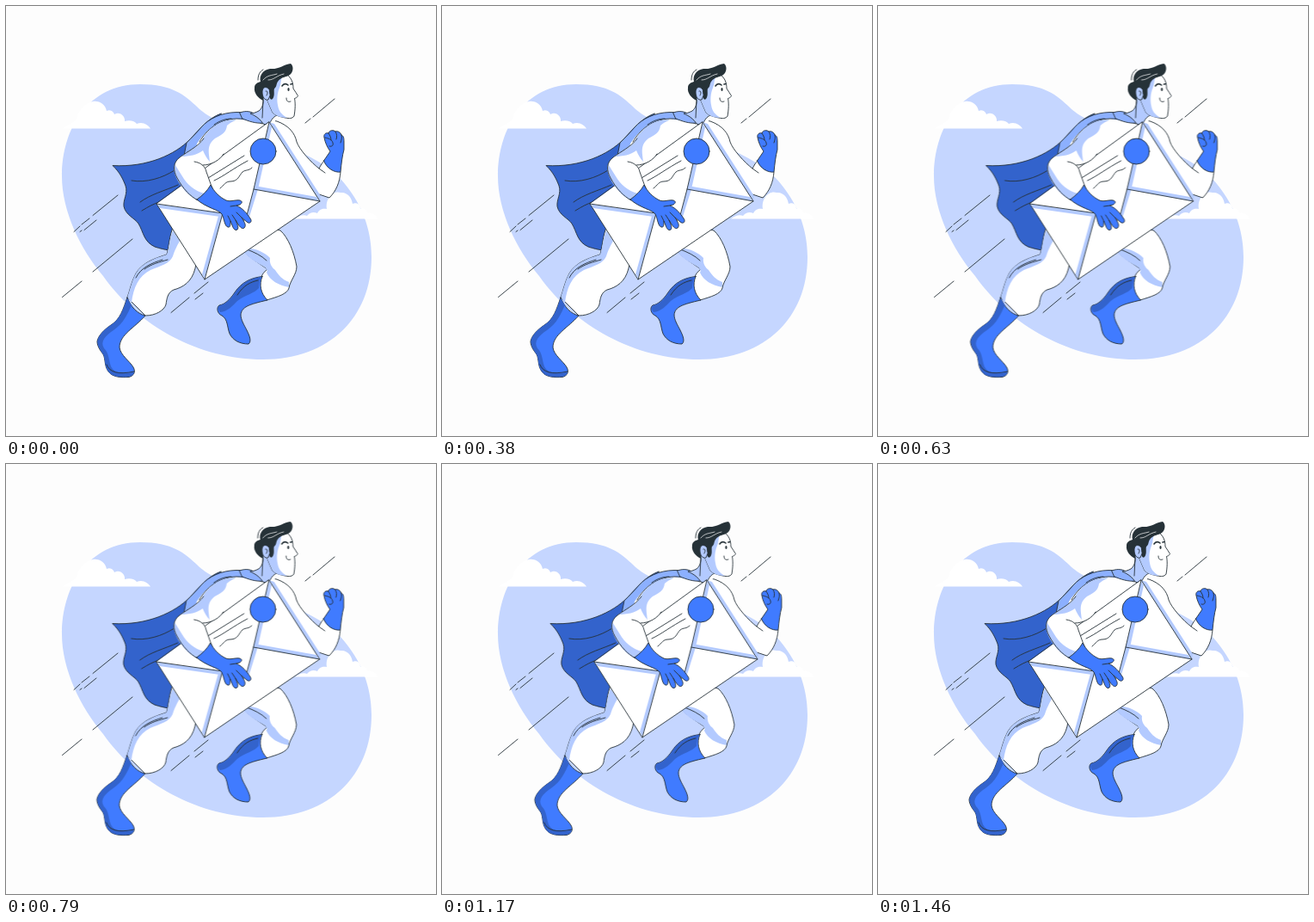
An HTML page for the animation above (1500 ms loop, 500 by 500 pixels).

```html
<!DOCTYPE html>
<html lang="en">
<head>
<meta charset="utf-8">
<title>Flying courier</title>
<style>
  html, body { margin: 0; width: 100%; height: 100%; overflow: hidden; background: #fdfdfd; }
  svg { display: block; width: 100%; height: 100%; }
  path, circle { stroke-linecap: round; stroke-linejoin: round; }
  .o { stroke: #263238; stroke-width: .9; }
  .l { fill: none; stroke: #263238; stroke-width: .9; }
  .w { fill: #fff; }
  .p { fill: #c5d6ff; }
  .s { fill: #b3caff; }
  .m { fill: #8cb0ff; }
  .b { fill: #407bff; }
  .d { fill: #3363cc; }
  .k { fill: #263238; }
  #hero { animation: shake 1.5s infinite; }
  @keyframes shake {
    10%, 90% { transform: translate(-1px, 0); }
    20%, 80% { transform: translate(2px, 0); }
    30%, 50%, 70% { transform: translate(-4px, 0); }
    40%, 60% { transform: translate(4px, 0); }
  }
</style>
</head>
<body>
<svg viewBox="0 0 500 500">
  <!-- backdrop -->
  <path class="p" d="M65 198C65 142 96 91 156 91C194 91 208 104 222 117C228 123 234 127 244 132C286 154 350 162 388 200C414 228 425 260 425 292C425 362 376 411 299 411C224 411 154 372 113 314C86 282 65 238 65 198Z"/>
  <path class="w" d="M66 142.500C72 137 79 137 82 131C85 121 92 112 101 111C109 110 115 114 117 122C122 120 125 123 126 126C132 122 139 128 138 134C144 132 150 134 152 137C159 134 165 138 168 142.500Z"/>
  <path class="w" d="M336 247.500C340 244 346 242 350 244C353 240 358 239 362 241C364 236 369 235 373 236C371 223 381 214 389 217C397 216 402 223 403 230C408 228 412 231 412 236C417 234 420 238 421 241C426 240 430 243 432 247.500Z"/>
  <path class="l" d="M348 136L354 131M357 129L382 108M130 220L101 243.500M97 247L88 254M86 256L79 262.500M105 249L91 260.500M88 261L86 262.500M147 271L101 309M88 320L65.500 338.500M235 321L219 334M213 339L192 356.500M229 334L220 341"/>

  <g id="hero">
    <!-- cape -->
    <path class="d o" d="M250 125C234 131 226 143 213 156C197 172 165 188 124 185.500C132 193 136 201 139 209C142 218 136 225 137 233C139 243 150 247 154 253C160 263 160 274 173 280C179 282 184 283 189 284L200 255L222 220L240 150Z"/>
    <path class="l" d="M146 203C163 206 182 200 196 191M156 228C168 219 184 215 200 208M158 238C166 233 172 230 178 228"/>
    <path class="m o" d="M299 136C292 128 281 123 268 123.500C250 124 236 131 227 141C221 148 217 152 210 159L207 174L225 165L250 136L280 140Z"/>

    <!-- raised arm -->
    <path class="w o" d="M300 132L315 134C329 139 336 148 338 158C341 167 355 182 364 189C366 185 368 182 370 180L389 193C388 205 384 215 376 223L361 218L330 190L298 160Z"/>
    <path class="l" d="M364 189L371 194"/>
    <path class="b o" d="M369.500 180L377 169C374 165 371 159 370 153C369 149 372 147 375 148C376 144 381 144 383 146C386 145 389 147 390 150C393 151 393 155 393 158L393 167C391 174 390 183 389 193C382 194 373 189 369.500 180Z"/>
    <path class="l" d="M375 148C377 151 378 153 378 156M383 146C385 149 385 152 384 155M390 150C391 153 390 156 389 159M371 153C375 154 379 155 380 159C381 162 379 164 376 163"/>

    <!-- leading leg -->
    <path class="w o" d="M270 278C279 290 291 297 304 306C300 309 298 312 297 315L289 328L303 342C316 338 327 335 329 328C330 320 338 312 338 303C335 286 328 269 319 261L290 255Z"/>
    <path class="s" d="M274 283C286 279 300 286 307 293C306 299 309 304 313 307C317 313 321 318 329 321L329 327C317 325 307 319 303 310C305 307 302 304 298 302C289 297 280 291 274 283Z"/>
    <path class="l" d="M280 283C288 286 297 290 303 296"/>
    <path class="b o" d="M298 314.500C285 316 274 321 266 333C260 342 254 347 248 348C244 351 246 358 251 360C258 364 257 373 260 381C264 389 272 393 282 393C286 390 283 383 280 377C277 371 273 365 273 359C274 350 282 347 304 342C296 334 294 324 298 314.500Z"/>
    <path class="d" d="M297 315C285 317 274 321 267 333C261 342 255 347 249 348C246 350 247 354 249 356C258 355 263 349 269 343C278 336 289 334 294 328C294 323 295 319 297 315Z"/>
    <path class="l" d="M269 336C276 325 284 321 293 319"/>

    <!-- trailing leg -->
    <path class="w o" d="M195 255C190 267 190 276 187 289C171 294 158 299 151 311C146 320 144 331 141 339L162 360C174 360 184 354 186 347C187 340 188 333 195 330C206 327 216 321 220 305L226 268Z"/>
    <path class="s" d="M187 289C171 294 158 299 151 311C146 320 144 331 141 339L146 345C148 328 154 314 168 307C180 302 190 300 194 291C196 284 200 277 202 273L194 261C190 271 190 280 187 289Z"/>
    <path class="l" d="M151 316C157 304 169 299 182 295M161 306C169 300 178 298 188 295"/>
    <path class="b o" d="M141 339C136 353 133 364 122 371C113 377 107 384 106 390C106 396 110 401 113 405C116 411 114 418 119 425C124 432 134 432 143 431.500C149 430 151 425 148 420C144 413 133 406 132 397C132 382 150 374 162 360C153 358 145 350 141 339Z"/>
    <path class="d" d="M141 340C136 353 133 364 122 371C113 377 107 384 106.500 390C107 396 110 401 113 405C116 411 114 418 119 425C124 432 134 431.500 143 431C147 430 149 428 149 425C140 429 126 428 122 419C119 410 120 404 114 398C109 390 116 383 125 377C137 369 141 358 146 348Z"/>
    <path class="l" d="M117 417C120 426 131 429 149 425"/>

    <!-- torso and neck -->
    <path class="w" d="M222 160C232 145 247 132 268 131L298 136L312 130L320 160L250 215L215 200Z"/>
    <path class="l" d="M225 158C233 144 247 132 268 131C280 131 290 133 298 137"/>
    <path class="m o" d="M272 124C282 120 292 124 299 136C291 137 282 134 275 131Z"/>
    <path class="s o" d="M299 105C300 113 298 119 294 122C290 124 287 125 284 125C291 128 296 132 299 137L306 139C308 132 311 129 315 127L310 103Z"/>
    <path class="l" d="M299 110L298 130"/>

    <!-- head -->
    <path class="w o" d="M327 80C332 84 334 89 334 96C336 99 338 102 339.500 104.500C338.500 106.500 337 107 335.500 107.500C336.500 112 336.500 120 335 128C333 131 329 131 325 130C319 129 313 127 310 124L304 110L305 90Z"/>
    <path class="s" d="M321 83C319 87 320 91 318 95C315 102 315 110 316 115C317 122 320 126 327 130C319 130 313 127 310 124L304 110L306 92Z"/>
    <path class="k" d="M299 110C293 107 288 101 289 95C289 91 292 89 296 88C294 81 299 74 307 73C317 74 323 68 331 67C335 70 334 77 330 80C326 83 320 82 316 88C314 91 315 94 312 96C311 99 313 104 310 108C308 110 306 107 306 103L303 95L299 98Z"/>
    <path class="s o" d="M306 97C302 92 298 95 298 100C298 106 301 110 305 109L307 104Z"/>
    <path class="l" d="M302 99C304 98 305 101 303 104M293 86C293 80 295 76 299 74M296 90C297 80 305 76 311 75"/>
    <path fill="none" stroke="#fff" stroke-width=".7" d="M299 86C304 80 309 81 315 79M305 86C312 86 314 81 323 79"/>
    <path fill="none" stroke="#263238" stroke-width="1.600" d="M321 93C323 90 326 90 328 92M331 91L333 90.500"/>
    <ellipse class="k" cx="328.500" cy="97" rx="1.100" ry="1.900"/>
    <path class="l" d="M326 107C326 111 328 112 331 111"/>

    <!-- envelope -->
    <path class="s" d="M306 135L365 227L366 221L312 137Z"/>
    <path class="w o" d="M306 135L365 227L231 318L175 230Z"/>
    <path class="s" d="M306 136L288 213L279 248L283 245L293 213L309 141Z"/>
    <path class="s" d="M176 230.500L252 241L249 245L179 235Z"/>
    <path class="s" d="M252 241L231 317L228 312L247 244Z"/>
    <path class="s" d="M288 213L364 227L361 222L289 209Z"/>
    <path class="l" d="M306 135L288 213L279 247Q276 252 269 248L252 241L175 230M252 241L231 318M288 213L365 227"/>
    <path class="l" d="M235 200L277 174M242 203C253 198 264 189 281 180M249 212C254 208 255 204 261 204C270 204 271 197 275 193C279 190 282 192 286 188"/>
    <circle class="b o" cx="299" cy="169" r="15"/>

    <!-- carrying arm -->
    <path class="w" d="M230 154C223 164 211 169 202 176C194 182 194 191 199 200C206 213 214 221 223 226L240 212C237 205 235 198 233 193C232 189 231 187 229 185C239 185 249 179 253 172C258 162 264 153 270 144L248 139Z"/>
    <path class="s" d="M268 132.500C251 131 235 142 228 156C223 165 211 169 203 175C214 175 222 173 229 168C231 173 234 178 237 181C236 170 233 162 243 154C251 150 256 147 257 139C260 136 264 134 268 132.500Z"/>
    <path class="s" d="M196 184C193 192 199 204 206 212C211 219 217 223 223 226L231 218C219 215 210 207 205 198C201 192 199 188 196 184Z"/>
    <path class="l" d="M230 154C223 164 211 169 202 176C194 182 194 191 199 200C206 213 214 221 223 226M240 212C237 205 235 198 233 193C232 187 227 182 219 181M229 185C239 185 249 179 253 172M242 138C249 133 256 131 262 131"/>
    <path class="b o" d="M222 225C229 220 234 215 238 208C242 216 248 222 256 226C261 228 267 225 272 226C275 227 275 229 272 231L268 232C275 235 280 241 284 247C287 251 283 254 280 251L274 246C277 251 280 255 277 258C275 260 272 257 270 254L267 249C269 254 271 258 269 260C266 262 264 258 263 255L261 250C261 254 261 258 258 257C254 256 254 248 251 242C248 237 233 235 222 225Z"/>
    <path class="l" d="M274 246L268 240M267 249L263 243M261 250L258 244M268 232L261 233"/>
  </g>
</svg>
</body>
</html>
```
